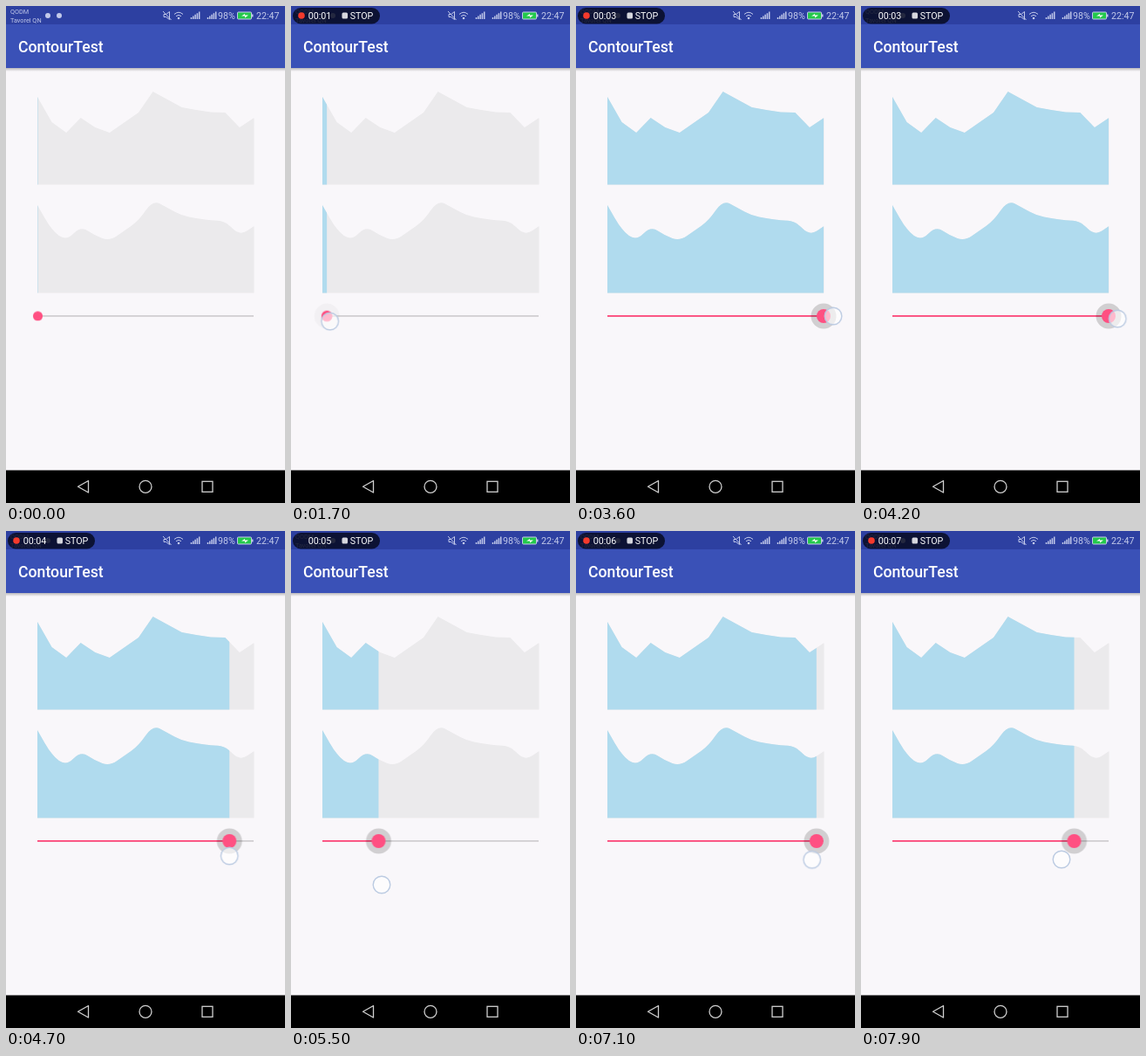
Animation of 320 by 569 pixels, one loop 8 s. Source, as an HTML page:

```html
<!DOCTYPE html>
<html lang="en">
<head>
<meta charset="utf-8">
<title>Chart slider</title>
<style>
@property --x { syntax: "<number>"; inherits: true; initial-value: 36.5; }
html, body { margin: 0; width: 100%; height: 100%; overflow: hidden; background: #f9f7fa; }
svg { display: block; width: 100%; height: 100%; font-family: Roboto, sans-serif; animation: slide 8s linear infinite; }
.played { width: calc(var(--x) * 1px - 36px); }
.thumb { transform: translate(calc(var(--x) * 1px), 355px); }
.knob { animation: grow 8s linear infinite; }
.halo { animation: halo 8s linear infinite; }
.touch { animation: touch 8s linear infinite; }
.pill { animation: pill 8s linear infinite; }
@keyframes slide {
  0%, 20% { --x: 36.5; }
  21.25% { --x: 41; }
  40% { --x: 276; }
  42.5%, 55% { --x: 284; }
  58.75% { --x: 256.5; }
  62.5% { --x: 189; }
  68.75% { --x: 100.5; }
  70% { --x: 97; }
  73.75% { --x: 140; }
  81.25% { --x: 246.5; }
  87.5% { --x: 280; }
  96.25% { --x: 251; }
  98.75%, 100% { --x: 244.5; }
}
@keyframes touch {
  0%, 18.7% { transform: translate(39px, 360px); opacity: 0; }
  18.75% { transform: translate(39px, 360px); opacity: 1; }
  21.25% { transform: translate(44.5px, 361px); }
  40% { transform: translate(283px, 381px); }
  45% { transform: translate(295px, 355px); }
  51.25% { transform: translate(298px, 356px); }
  55% { transform: translate(287px, 362px); }
  58.75% { transform: translate(256.5px, 372px); }
  62.5% { transform: translate(190px, 390px); }
  68.75% { transform: translate(104px, 405px); }
  70% { transform: translate(101px, 404px); }
  73.75% { transform: translate(140px, 393px); }
  81.25% { transform: translate(241px, 379px); }
  87.5% { transform: translate(276px, 376px); }
  96.25% { transform: translate(239px, 378px); }
  98.75%, 100% { transform: translate(230px, 376px); opacity: 1; }
}
@keyframes grow { 0%, 20% { transform: scale(.69); } 24%, 100% { transform: scale(1); } }
@keyframes halo { 0%, 20.5% { opacity: 0; } 25%, 100% { opacity: 1; } }
@keyframes pill { 0%, 1% { opacity: 0; } 3.5%, 100% { opacity: 1; } }
</style>
</head>
<body>
<svg viewBox="0 0 320 569" preserveAspectRatio="none">
  <defs>
    <linearGradient id="shade" x2="0" y2="1">
      <stop stop-color="#000" stop-opacity=".25"/>
      <stop offset="1" stop-color="#000" stop-opacity="0"/>
    </linearGradient>
    <clipPath id="progress"><rect class="played" x="36" y="80" height="260"/></clipPath>
    <g id="charts"><path id="sharp"/><path id="smooth"/></g>
    <path id="bars" d="M0 15v-2M2.3 15v-3.6M4.6 15v-5.2M6.9 15v-6.8M9.2 15v-8.5" stroke="#c2c9ea" stroke-width="1.5"/>
  </defs>

  <rect width="320" height="569" fill="#f9f7fa"/>
  <rect y="71" width="320" height="4" fill="url(#shade)"/>
  <rect width="320" height="71" fill="#3a51b7"/>
  <rect width="320" height="21" fill="#2d40a1"/>
  <text x="14" y="53" font-size="17.7" font-weight="500" fill="#fff">ContourTest</text>

  <g fill="#c2c9ea">
    <g font-size="7.3">
      <text x="5" y="9">QODM</text>
      <text x="5" y="19">Tavorel QN</text>
    </g>
    <circle cx="48" cy="11" r="3"/>
    <circle cx="61" cy="11" r="3"/>
    <g fill="none" stroke="#c2c9ea">
      <path d="M181 9.500h2.500l4-3v9l-4-3h-2.500zM180 6l9.500 10"/>
      <path d="M193 9.500q5-4.500 10 0M195 11.700q3-2.700 6 0"/>
    </g>
    <circle cx="198" cy="14" r="1.300"/>
    <use href="#bars" x="212.500"/>
    <use href="#bars" x="231.500"/>
    <g font-size="10.700">
      <text x="243" y="14.500">98%</text>
      <text x="287" y="14.800">22:47</text>
    </g>
    <rect x="265.500" y="7" width="16" height="8" rx="1" fill="#23c84b" stroke="#c2c9ea"/>
    <rect x="282" y="9.500" width="1.500" height="3"/>
    <path d="M270 11.500l4-2.500v1.500h4l-4 3v-2z" fill="#fff"/>
  </g>

  <g class="pill">
    <rect x="2" y="2" width="100" height="18.500" rx="9.250" fill="#060a20" fill-opacity=".84"/>
    <circle id="dot" cx="12" cy="11" r="3.800" fill="#f33a2c"/>
    <g fill="#fff" font-size="10.700">
      <text id="clock" x="19.700" y="15">00:00</text>
      <text x="67.700" y="15">STOP</text>
    </g>
    <rect x="58.500" y="7.500" width="6.500" height="7" rx="1.500" fill="#d5d6de"/>
  </g>

  <use href="#charts" fill="#ebeaec"/>
  <use href="#charts" fill="#b0dbee" clip-path="url(#progress)"/>

  <rect x="36" y="354" width="248" height="1.800" fill="#d1cfd2"/>
  <rect class="played" x="36" y="354" height="1.800" fill="#ff4a7c"/>
  <g class="thumb">
    <circle class="halo" r="14.500" fill="#000" fill-opacity=".16"/>
    <circle class="knob" r="8" fill="#ff5082"/>
  </g>
  <circle class="touch" r="9.800" fill="#fff" fill-opacity=".6" stroke="#bccbe2" stroke-width="1.400"/>

  <rect y="531.500" width="320" height="37.500"/>
  <g fill="none" stroke="#d0d0d0" stroke-width="1.300">
    <path d="M94.500 543.500v13.500l-12-6.700z" stroke-linejoin="round"/>
    <circle cx="160" cy="550.300" r="7"/>
    <rect x="225" y="544.300" width="12" height="12"/>
  </g>
</svg>
<script>
const $ = id => document.getElementById(id);
const left = 36, right = 284.5, drop = 124;
const heights = [104, 133, 145, 128, 139, 145, 133.5, 122, 98, 107, 116, 119, 121.5, 122, 139, 128];
const points = heights.map((y, i) => [left + (right - left) * i / (heights.length - 1), y]);

const area = (line, base) => `M${left} ${base}L${line}L${right} ${base}Z`;

// Smooth line: each inner point steers a curve between neighbouring midpoints.
function smoothLine(pts) {
  const mid = i => pts[i].map((v, k) => (v + pts[i + 1][k]) / 2);
  const curves = pts.slice(1, -1).map((p, i) => `Q${p} ${mid(i + 1)}`);
  return `${pts[0]}L${mid(0)}${curves.join("")}L${pts.at(-1)}`;
}

$("sharp").setAttribute("d", area(points.join("L"), 204.5));
$("smooth").setAttribute("d", area(smoothLine(points.map(([x, y]) => [x, y + drop])), 204.5 + drop));

const motion = document.querySelector("svg").getAnimations()[0];
const blink = 1080;

function tick() {
  const t = (motion.currentTime || 0) % 8000;
  const seconds = Math.max(0, Math.floor((t - 450) / 1000));
  $("clock").textContent = `00:0${seconds}`;
  $("dot").style.opacity = (t + 2 * blink - 1300) % blink < blink / 2 ? 1 : 0;
  requestAnimationFrame(tick);
}
tick();
</script>
</body>
</html>
```
